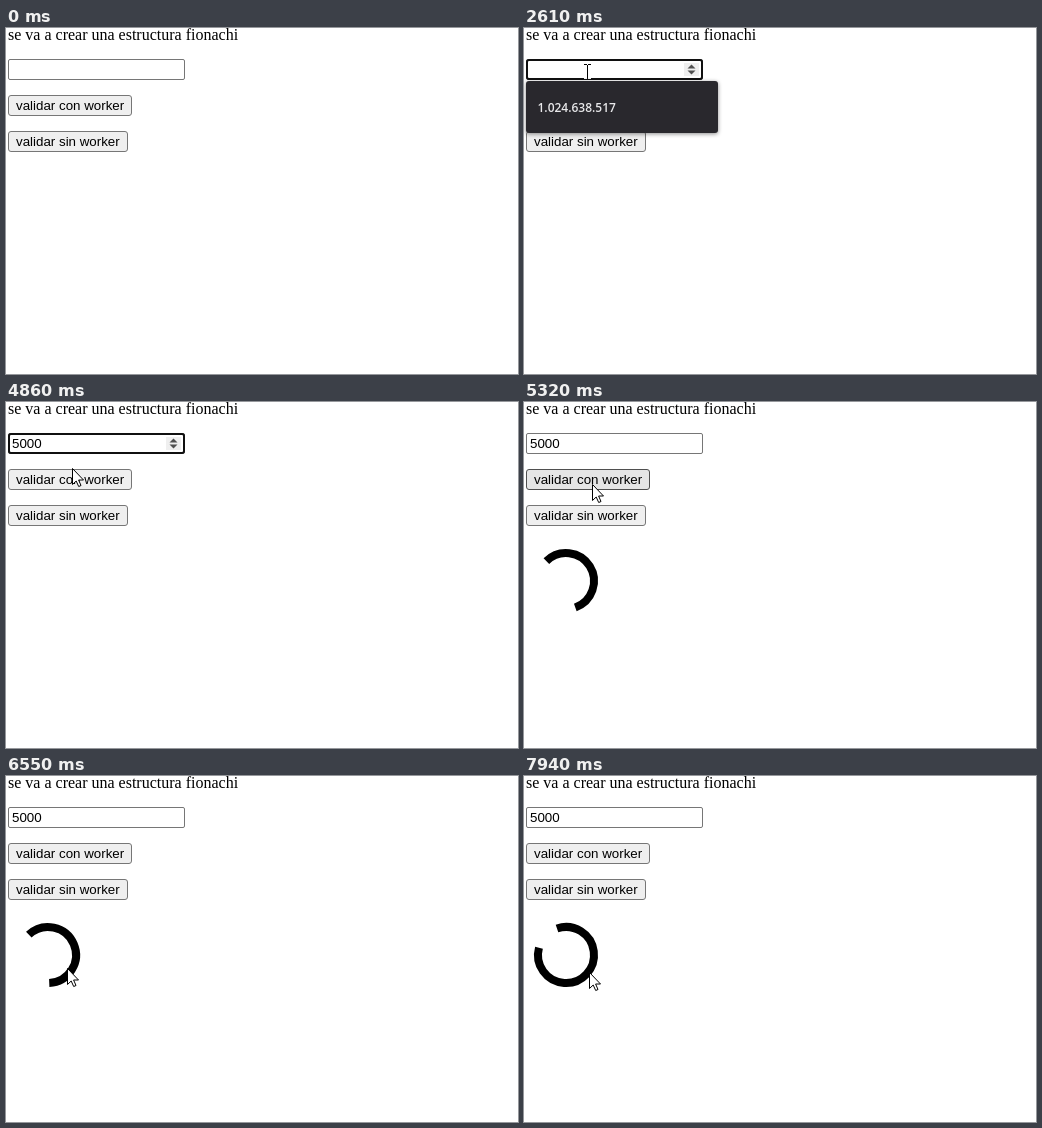
Animation of 512 by 346 pixels, one loop 8000 ms. Source, as an HTML page:

```html
<!DOCTYPE html>
<html lang="es">
<head>
<meta charset="utf-8">
<title>Worker</title>
<style>
  html, body { margin: 0; width: 512px; height: 346px; overflow: hidden; background: #fff; }
  svg { display: block; }
  text { font: 13.333px "Liberation Sans", Arial, sans-serif; white-space: pre; }
  .title { font: 16px "Liberation Serif", "Times New Roman", serif; }
  .button rect { fill: #efefef; stroke: #767676; }
  .button.hover rect { fill: #e5e5e5; stroke: #4f4f4f; }
  .button.active rect { fill: #f5f5f5; stroke: #8d8d8d; }
  #field { fill: #fff; stroke: #767676; }
  #menu rect { fill: #29282d; filter: drop-shadow(0 1px 2px rgba(0, 0, 0, .45)); }
  #menu text { font: 600 12px "Open Sans", sans-serif; fill: #e8e8ea; }
  #ring { fill: none; stroke: #000; stroke-width: 8; }
  #beam { fill: none; stroke: #fff; mix-blend-mode: difference; }
  #arrow { fill: #fff; stroke: #000; }
  #click { fill: #ffff80; mix-blend-mode: multiply; }
</style>
</head>
<body>
<svg width="512" height="346" viewBox="0 0 512 346">
  <rect width="512" height="346" fill="#fff"/>
  <text class="title" x="2" y="12">se va a crear una estructura fionachi</text>

  <rect id="field" x="2.5" y="31.5" width="176" height="20" rx="1.5"/>
  <rect id="focus" x="3" y="32" width="175" height="19" rx="2" fill="#fff" stroke="#101010" stroke-width="2"/>
  <g id="spin">
    <rect x="160" y="35" width="15" height="13" fill="#efefef"/>
    <path d="M163.500 40.500L167.500 36.500L171.500 40.500ZM163.500 42.500L167.500 46.500L171.500 42.500Z" fill="#505050"/>
  </g>
  <text id="value" x="6" y="46"></text>
  <rect id="caret" y="34" width="1" height="15"/>

  <g class="button" id="withWorker">
    <rect x="2.5" y="67.5" width="123" height="20" rx="2.5"/>
    <text x="10" y="82">validar con worker</text>
  </g>
  <g class="button" id="noWorker">
    <rect x="2.5" y="103.500" width="119" height="20" rx="2.5"/>
    <text x="10" y="118">validar sin worker</text>
  </g>

  <path id="ring"/>
  <g id="menu">
    <rect x="2" y="53" width="192" height="52" rx="3"/>
    <text x="13.5" y="84">1.024.638.517</text>
  </g>

  <path id="beam" d="M-3 -6.500H0M1 -6.500H4M.5 -6V7M-3 7.500H0M1 7.500H4"/>
  <path id="arrow" d="M.5 .5V16.500L4.200 13L6.700 18.500L9 17.500L6.600 12H11.500Z"/>
  <circle id="click" r="11.7"/>
</svg>
<script>
  const LOOP = 8000, STEP = 1000 / 13, RING_START = 5276;
  const $ = id => document.getElementById(id);
  const show = (id, on) => $(id).style.display = on ? '' : 'none';
  const within = (v, from, to) => v >= from && v < to;

  // Pointer stops: time, x, y
  const stops = [
    [202, 406, 324], [970, 63, 43], [4553, 63, 43], [5090, 68, 82],
    [5400, 68, 82], [6240, 61, 192], [7100, 61, 192], [7700, 65, 196]
  ];
  const keyTimes = [2690, 3150, 3530, 3930];
  const caretSpans = [[1050, 1600], [2150, 2610], [2690, 4480], [5010, 5240]];

  // The screen is sampled at 13 fps while something moves
  function sample(t) {
    const start = (t < 4622 ? 210 : 4630) - 8;
    return start + Math.floor((t - start) / STEP) * STEP;
  }

  function pointerAt(t) {
    const next = stops.findIndex(s => s[0] > t);
    if (next < 0) return stops.at(-1).slice(1);
    if (next === 0) return stops[0].slice(1);
    const [t0, x0, y0] = stops[next - 1], [t1, x1, y1] = stops[next];
    const u = (t - t0) / (t1 - t0), e = u * u * (3 - 2 * u);
    return [x0 + (x1 - x0) * e, y0 + (y1 - y0) * e].map(Math.round);
  }

  // Turns made after p cycles of cubic-bezier(.5, 0, .5, 1)
  function turns(p) {
    const whole = Math.floor(p);
    let lo = 0, hi = 1;
    for (let i = 0; i < 20; i++) {
      const s = (lo + hi) / 2;
      if (1.5 * s * (1 - s) + s ** 3 < p - whole) lo = s; else hi = s;
    }
    return whole + lo * lo * (3 - 2 * lo);
  }

  // Four overlapping quarter arcs, 150 ms apart, form one arc
  function ringPath(t) {
    const p = (t - RING_START) / 1200;
    const from = turns(p) - 3 / 8, to = turns(p + .375) - 1 / 8;
    const point = a => [42 + 28 * Math.cos(a * 2 * Math.PI), 179 + 28 * Math.sin(a * 2 * Math.PI)];
    return `M${point(from)}A28 28 0 ${to - from > .5 ? 1 : 0} 1 ${point(to)}`;
  }

  function draw(t) {
    const now = sample(t), [x, y] = pointerAt(now);
    const visible = t >= 210;
    const over = (right, top) => visible && within(x, 2, right) && within(y, top, top + 21);
    const inField = over(179, 31);
    const focused = within(t, 1050, 5240), pressed = within(t, 5240, 5320);
    const typed = keyTimes.filter(k => t >= k).length;

    show('focus', focused);
    show('spin', focused || inField);
    show('menu', within(t, 1050, 2690));
    $('value').textContent = '5000'.slice(0, typed);
    show('caret', caretSpans.some(([a, b]) => within(t, a, b)));
    $('caret').setAttribute('x', Math.round(6 + 7.415 * typed));

    $('withWorker').classList.toggle('hover', over(126, 67));
    $('withWorker').classList.toggle('active', pressed);
    $('noWorker').classList.toggle('hover', over(122, 103));

    show('ring', t >= 5320);
    if (t >= 5320) $('ring').setAttribute('d', ringPath(now));

    show('beam', inField);
    show('arrow', visible && !inField);
    show('click', pressed || within(t, 1050, 1140));
    for (const id of ['beam', 'arrow']) $(id).setAttribute('transform', `translate(${x} ${y})`);
    $('click').setAttribute('transform', `translate(${x - 1.5} ${y - 1})`);
  }

  const origin = performance.now();
  function frame() {
    draw((performance.now() - origin) % LOOP);
    requestAnimationFrame(frame);
  }
  frame();
</script>
</body>
</html>
```
